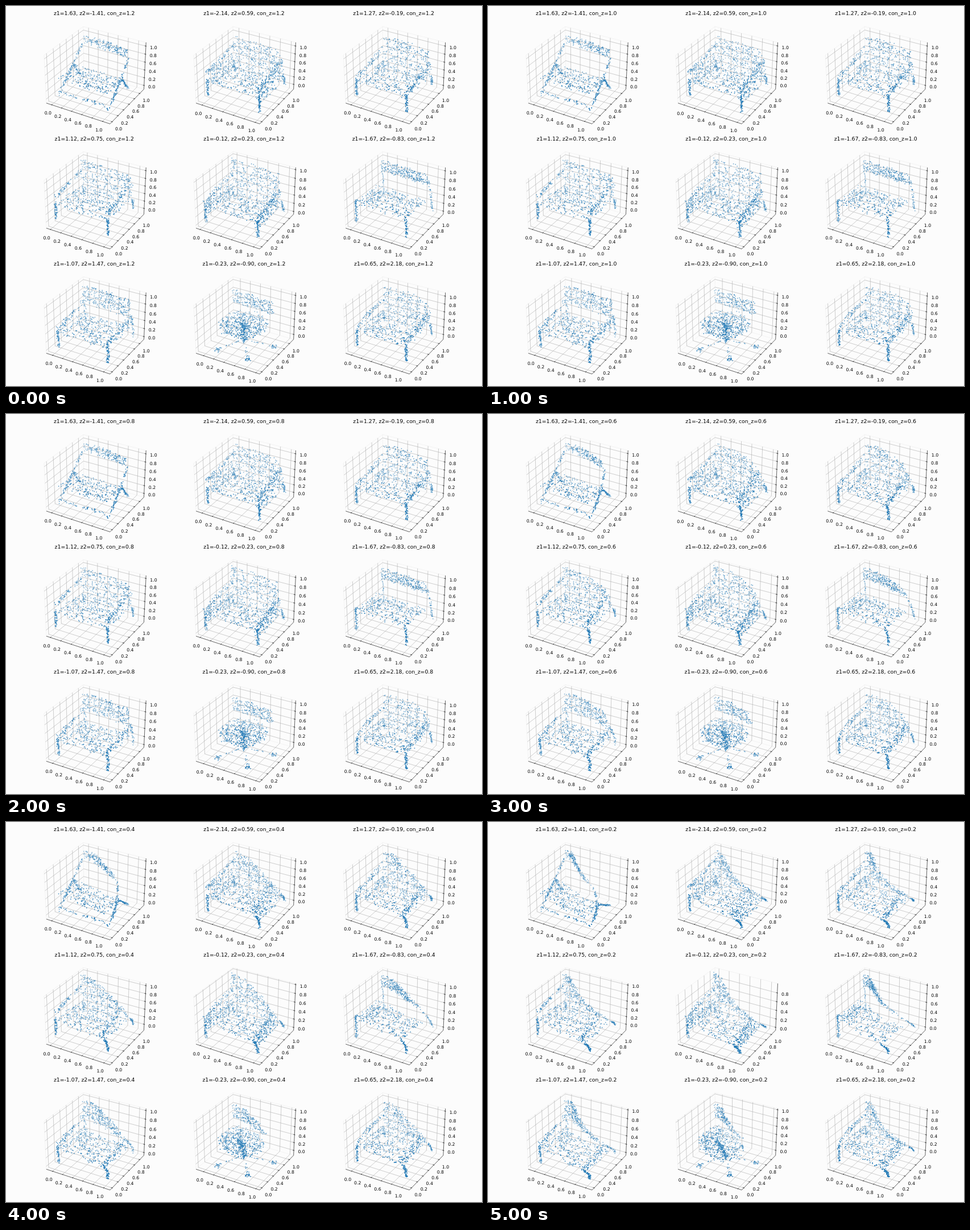
Animation, 837 px wide and 669 px high, one loop 5500 ms. Source, as an HTML page with a canvas:

```html
<!DOCTYPE html>
<html lang="en">
<head>
<meta charset="utf-8">
<title>Chair point clouds</title>
<style>
html, body { margin: 0; width: 100%; height: 100%; overflow: hidden; background: #fcfcfc; }
canvas { display: block; }
</style>
</head>
<body>
<canvas id="stage" width="837" height="669"></canvas>
<script>
const ctx = document.getElementById('stage').getContext('2d');
const STEP = 500, STEPS = 11;
const EDGE = 1 / 48;

let seed = 7, cloud;
function rnd() {
  seed = (seed + 0x6D2B79F5) | 0;
  let t = Math.imul(seed ^ (seed >>> 15), 1 | seed);
  t = (t + Math.imul(t ^ (t >>> 7), 61 | t)) ^ t;
  return ((t ^ (t >>> 14)) >>> 0) / 4294967296;
}
const mix = (a, b, t) => a + (b - a) * t;

// Scatter builders: filled box, jittered rod, and a left/right pair of rods
function box(n, x0, x1, y0, y1, z0, z1) {
  while (n--) cloud.push([mix(x0, x1, rnd()), mix(y0, y1, rnd()), mix(z0, z1, rnd())]);
}
function rod(n, a, b, spread = .04) {
  while (n--) {
    const t = rnd();
    cloud.push(a.map((v, i) => mix(v, b[i], t) + (rnd() - .5) * spread));
  }
}
function pair(n, a, b, spread) {
  for (const x of [.03, 1]) rod(n, [x, ...a], [x, ...b], spread);
}

function armchair({ seat = .4, depth = .88, back = .38, arm, solid }) {
  box(270, .01, 1, .9, .98, back, 1.03);
  box(290, .02, 1, .07, depth, seat - .04, seat + .05);
  pair(50, [.07, .04], [.07, seat + .08]);
  pair(30, [.98, .08], [.93, back]);
  if (arm) pair(65, [.07, arm], [.92, arm + .18], .08);
  if (solid) for (const x of [0, .93]) box(90, x, x + .08, .08, .92, .2, arm);
}

function foldingChair() {
  box(190, .04, 1, .92, .98, .83, 1.03);
  box(220, .03, 1, .1, .65, .42, .5);
  box(40, .05, 1, .08, .12, .1, .2);
  pair(90, [.1, .05], [.92, .85]);
  pair(50, [.6, .5], [.82, .1]);
}

function swivelChair() {
  box(210, .02, .85, .82, .9, .64, .97);
  for (let i = 0; i < 430; i++) {
    const a = rnd() * 2 * Math.PI, r = .42 * rnd() ** .7;
    cloud.push([.48 + r * Math.cos(a), .45 + r * Math.sin(a), .43 + rnd() * .16]);
  }
  rod(90, [.48, .45, .1], [.48, .45, .5], .09);
  for (let i = 0; i < 5; i++) {
    const a = -.95 + i * 2 * Math.PI / 5;
    const end = [.5 + .5 * Math.cos(a), .45 + .5 * Math.sin(a), .03];
    rod(14, [.48, .45, .14], end);
    rod(15, end, end, .08);
  }
}

// Each chair: its latent pair, the visible range of x and z, and its build
const plots = [
  { z1: '1.63', z2: '-1.41', x: [-.11, 1.14], z: [-.1, 1.09], build: foldingChair },
  { z1: '-2.14', z2: '0.59', x: [-.12, 1.08], z: [-.13, 1.09], arm: .62, solid: true },
  { z1: '1.27', z2: '-0.19', x: [-.11, 1.13], z: [-.1, 1.09], arm: .5 },
  { z1: '1.12', z2: '0.75', x: [-.08, 1.11], z: [-.16, 1.08], arm: .6 },
  { z1: '-0.12', z2: '0.23', x: [-.08, 1.11], z: [-.07, 1.05], arm: .5, solid: true },
  { z1: '-1.67', z2: '-0.83', x: [-.1, 1.13], z: [-.08, 1.08], seat: .5, depth: .75, back: .76 },
  { z1: '-1.07', z2: '1.47', x: [-.13, 1.12], z: [-.07, 1.07], back: .6, arm: .48 },
  { z1: '-0.23', z2: '-0.90', x: [-.15, 1.07], z: [-.13, 1.07], build: swivelChair },
  { z1: '0.65', z2: '2.18', x: [-.12, 1.14], z: [-.13, 1.09], arm: .52 }
];
for (const plot of plots) {
  plot.cloud = cloud = [];
  (plot.build || armchair)(plot);
}

// Bend a point so that x * z stays below c, keeping x² - z² unchanged
function bend([x, y, z], c) {
  if (x <= 0 || z <= 0) return [x, y, z];
  const cap = Math.min(c, .85), s = x * z;
  const area = cap * s / (cap + (1 - cap) * s);
  const d = x * x - z * z, h = Math.hypot(d, 2 * area);
  return [Math.sqrt((h + d) / 2), y, Math.sqrt((h - d) / 2)];
}

// Axis fractions to panel pixels and nearness, seen from elevation 30, azimuth -60
function project(tx, ty, tz) {
  const x = (2 * tx - 1) * .5952, y = (2 * ty - 1) * .5952, z = (2 * tz - 1) * .4464;
  const near = .433 * x - .75 * y + .5 * z;
  const s = 1078 / (10 - near);
  return [158.3 + (.866 * x + .5 * y) * s,
          117.7 - (-.25 * x + .433 * y + .866 * z) * s, near];
}

function path(color, ...corners) {
  ctx.strokeStyle = color;
  ctx.beginPath();
  for (const c of corners) ctx.lineTo(...project(...c).slice(0, 2));
  ctx.stroke();
}

// For each axis: grid line, tick mark, tick place and label offset
const axes = [
  { grid: t => [[t, 1, 1], [t, 1, 0], [t, 0, 0]],
    tick: t => [[t, -.01, 0], [t, .018, 0]], at: t => [t, 0, 0], dx: -6.5, dy: 14.5 },
  { grid: t => [[0, t, 1], [0, t, 0], [1, t, 0]],
    tick: t => [[1.01, t, 0], [.982, t, 0]], at: t => [1, t, 0], dx: 11.5, dy: 12.5 },
  { grid: t => [[0, 0, t], [0, 1, t], [1, 1, t]],
    tick: t => [[1.01, 1, t], [.982, 1, t]], at: t => [1, 1, t], dx: 13.5, dy: 2.5 }
];

function drawPlot({ z1, z2, x, z, cloud }, step) {
  const c = 1.2 - step / 10, u = step / (STEPS - 1);
  const ranges = [x, [-.07, 1.165], [z[0], z[1] - .04 * u * u]];
  const fraction = (v, i) => (v - ranges[i][0]) / (ranges[i][1] - ranges[i][0]);

  ctx.fillStyle = '#000';
  ctx.font = '9.3px "DejaVu Sans", sans-serif';
  ctx.fillText(`z1=${z1}, z2=${z2}, con_z=${c.toFixed(1)}`, 155.2, 16.3);

  ctx.lineWidth = .62;
  path('#eeeeee', [0, 0, 0], [0, 0, 1], [0, 1, 1], [1, 1, 1]);
  path('#eeeeee', [0, 0, 0], [0, 1, 0], [1, 1, 0]);
  path('#eeeeee', [0, 1, 0], [0, 1, 1]);

  const marks = [];
  axes.forEach((axis, i) => {
    for (let k = 0; k <= 6; k++) {
      const t = fraction(k / 5, i);
      if (t > EDGE && t < 1 - EDGE) marks.push({ axis, t, text: (k / 5).toFixed(1) });
    }
  });
  for (const { axis, t } of marks) path('#b0b0b0', ...axis.grid(t));
  path('#000', [0, 0, 0], [1, 0, 0], [1, 1, 0], [1, 1, 1]);
  ctx.font = '7.75px "DejaVu Sans", sans-serif';
  for (const { axis, t, text } of marks) {
    path('#000', ...axis.tick(t));
    const [px, py] = project(...axis.at(t));
    ctx.fillText(text, px + axis.dx, py + axis.dy + 2.8);
  }

  // Nearer dots are more opaque
  const dots = cloud
    .map(p => project(...bend(p, c).map(fraction)))
    .sort((a, b) => a[2] - b[2]);
  const far = dots[0][2], depth = dots[dots.length - 1][2] - far;
  ctx.fillStyle = '#1f77b4';
  for (const [px, py, near] of dots) {
    ctx.globalAlpha = .3 + .7 * (near - far) / depth;
    ctx.beginPath();
    ctx.arc(px, py, .88, 0, 2 * Math.PI);
    ctx.fill();
  }
  ctx.globalAlpha = 1;
}

function draw(step) {
  ctx.fillStyle = '#fcfcfc';
  ctx.fillRect(0, 0, 837, 669);
  ctx.textAlign = 'center';
  plots.forEach((plot, i) => {
    ctx.save();
    ctx.translate(i % 3 * 263.2, Math.floor(i / 3) * 220.2);
    drawPlot(plot, step);
    ctx.restore();
  });
}

let shown = -1;
const start = performance.now();
function tick() {
  const step = Math.floor((performance.now() - start) / STEP) % STEPS;
  if (step !== shown) draw(shown = step);
  requestAnimationFrame(tick);
}
tick();
</script>
</body>
</html>
```
